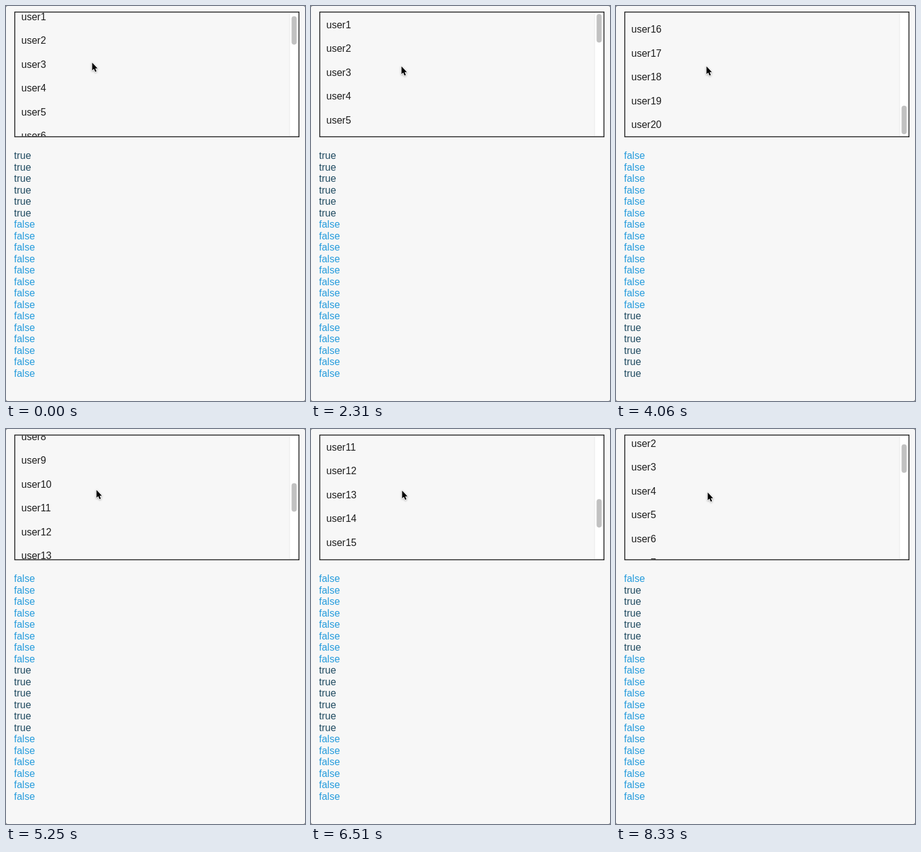
Write an HTML page with a canvas that moves like this. It is 484 by 638 pixels and loops after 8400 ms.

```html
<!DOCTYPE html>
<html lang="en">
<head>
<meta charset="utf-8">
<title>Scroll visibility</title>
<style>
  html, body { margin: 0; width: 100%; height: 100%; overflow: hidden; background: #777; }
  canvas { display: block; border-radius: 3px; }
</style>
</head>
<body>
<canvas id="stage" width="484" height="638"></canvas>
<script>
const ctx = document.getElementById('stage').getContext('2d');
const LOOP = 8400, STEP = 70, PULL = 300;
const ROWS = 20, ROW_H = 38.5, LINE_H = 18.5;
const VIEW_H = 200, MAX_SCROLL = ROWS * ROW_H - VIEW_H;

// Each pull on the list: when it comes to rest, and at which offset
const pulls = [
  [420, 165], [840, 427.5], [1320, MAX_SCROLL],
  [1960, 165], [2310, 0],
  [3150, 280], [3570, 397], [4060, MAX_SCROLL],
  [4690, 512], [5040, 325], [5460, 150], [5880, 0],
  [6510, 386], [7070, MAX_SCROLL],
  [7840, 355], [8300, 45.5]
];

const arrow = new Path2D('M0 0V12.6L2.8 10L4.9 14.8L7 13.9L5 9.2H8.7Z');

const smooth = u => u * u * (3 - 2 * u);
const clamp = u => Math.min(1, Math.max(0, u));

function scrollAt(t) {
  return pulls.reduce((offset, [end, to]) =>
    offset + (to - offset) * smooth(clamp(1 - (end - t) / PULL)), 13);
}

// The flags trail the scrolling by one step
function isVisible(row, t) {
  const top = row * ROW_H - scrollAt(Math.max(0, t - STEP));
  return top + ROW_H > 0 && top < VIEW_H;
}

function text(string, x, y, color) {
  ctx.fillStyle = color;
  ctx.fillText(string, x, y);
}

function drawList(scroll) {
  ctx.save();
  ctx.beginPath();
  ctx.rect(15, 10.5, 444, VIEW_H);
  ctx.clip();
  for (let i = 0; i < ROWS; i++) {
    text('user' + (i + 1), 24.8, 35.5 + i * ROW_H - scroll, '#1c1c1c');
  }
  ctx.restore();

  ctx.fillStyle = '#fff';
  ctx.fillRect(459, 10.5, 15, VIEW_H);
  ctx.fillStyle = '#e9e9e9';
  ctx.fillRect(458.5, 10.5, 1, VIEW_H);
  ctx.fillStyle = '#c1c1c1';
  ctx.beginPath();
  ctx.roundRect(462.3, 13 + scroll / MAX_SCROLL * 148, 8.2, 46, 4.1);
  ctx.fill();

  ctx.strokeStyle = '#262626';
  ctx.lineWidth = 1.5;
  ctx.strokeRect(14.25, 9.75, 460, 201.5);
}

function drawFlags(t) {
  for (let i = 0; i < ROWS; i++) {
    const visible = isVisible(i, t);
    text(String(visible), 13, 247 + i * LINE_H, visible ? '#1f4a60' : '#249bdc');
  }
}

// The pointer drifts twice, slowly at first
function drawPointer(t) {
  const first = clamp(t / 1470) ** 3;
  const second = clamp((t - 1470) / 6930) ** 3;
  ctx.save();
  ctx.translate(Math.round(139 + 7 * first + 2 * second) + 0.5,
                Math.round(91 + 6 * first + 5.5 * second) + 0.5);
  ctx.lineJoin = 'round';
  ctx.lineWidth = 1.6;
  ctx.strokeStyle = '#fff';
  ctx.shadowColor = 'rgba(0,0,0,.35)';
  ctx.shadowBlur = 3;
  ctx.shadowOffsetY = 1;
  ctx.stroke(arrow);
  ctx.shadowColor = 'transparent';
  ctx.fillStyle = '#000';
  ctx.fill(arrow);
  ctx.restore();
}

function draw() {
  const t = Math.floor(performance.now() % LOOP / STEP) * STEP;
  ctx.fillStyle = '#f7f7f7';
  ctx.fillRect(0, 0, 484, 638);
  ctx.font = '16px "Liberation Sans", Arial, sans-serif';
  drawList(scrollAt(t));
  drawFlags(t);
  drawPointer(t);
  requestAnimationFrame(draw);
}
draw();
</script>
</body>
</html>
```
